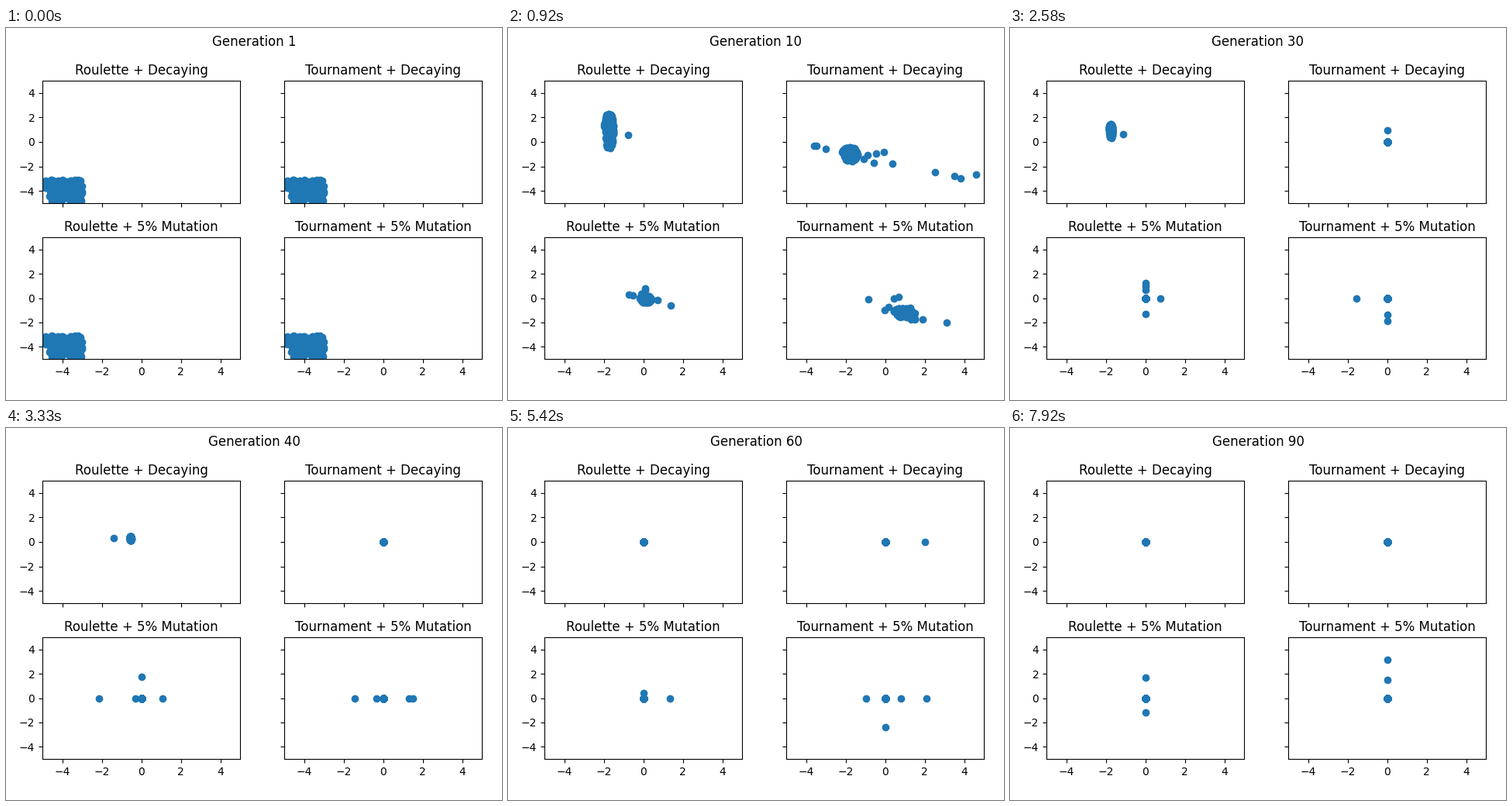
A matplotlib script that plays this animation: 640x480 px, repeating every 8 s.

```python
from collections import namedtuple

import numpy as np
import matplotlib.pyplot as plt
from matplotlib.animation import FuncAnimation

W, H, DPI = 640, 480, 100
LOOP_MS, TICK_MS = 8000, 50
GENERATIONS = 96
LEAD_MS = 40          # generations change slightly ahead of the tick grid
MEET = 11             # generation at which each population reaches its waypoint
TICKS = range(-4, 5, 2)

plt.rcParams["font.family"] = "DejaVu Sans"

# way, spread: cluster centre and half size at the waypoint
# hold, settle: generations when it leaves the waypoint and reaches the origin
# strays, reach: number and distance of early outliers
# mutants: most outliers per generation later on
Panel = namedtuple("Panel", "name way spread hold settle strays reach mutants")
PANELS = [
    Panel("Roulette + Decaying", (-1.75, 0.9), (0.25, 1.5), 31, 44, 2, 0.7, 1),
    Panel("Tournament + Decaying", (-1.8, -1), (0.4, 0.6), 12, 22, 14, 2.8, 1),
    Panel("Roulette + 5% Mutation", (0.1, -0.1), (0.3, 0.3), 12, 18, 5, 0.9, 6),
    Panel("Tournament + 5% Mutation", (0.9, -1.2), (0.5, 0.4), 12, 20, 10, 1, 6),
]

# Shared starting population in a square, thin near the left edge
square = np.random.default_rng(4).uniform(-1, 1, (130, 2))
square = square[(square[:, 0] > -0.65) | (np.abs(square[:, 1] + 0.35) > 0.4)]
disc = square * np.sqrt(1 - square[:, ::-1] ** 2 / 2)


def cluster(p, gen):
    """The square block moves to the waypoint, rounds off, then shrinks to the origin."""
    def along(steps, values):
        return np.array([np.interp(gen, steps, v) for v in zip(*values)])

    origin = (0, 0)
    centre = along((0, MEET, p.hold, p.settle), ((-4, -4), p.way, p.way, origin))
    size = along((0, MEET, p.settle), ((1, 0.95), p.spread, origin))
    rounding = min(gen / MEET, 1)
    return centre + size * (square + (disc - square) * rounding)


def outliers(p, gen, pop, rng):
    # Early strays lie along a falling slope
    fade = np.clip(min(gen / 4, (2 * MEET - gen) / MEET), 0, 1)
    n = round(p.strays * fade)
    dx = rng.normal(0, p.reach, n)
    dy = -0.35 * dx + rng.normal(0, 0.3, n)
    early = pop.mean(axis=0) + np.column_stack([dx, dy])

    # Mutants change one coordinate only
    n = rng.integers(p.mutants // 3, p.mutants + 1)
    late = rng.choice(pop, n)
    late[np.arange(n), rng.integers(2, size=n)] += rng.normal(0, 1.1, n)
    return np.vstack([early, late])


def population(i, gen):
    pop = cluster(PANELS[i], gen)
    if gen == 0:
        return pop
    rng = np.random.default_rng(1000 * i + gen)
    return np.vstack([pop, outliers(PANELS[i], gen, pop, rng)])


fig = plt.figure(figsize=(W / DPI, H / DPI), dpi=DPI, facecolor="white")
title = fig.suptitle("Generation 1", fontsize=12, y=0.982)
dots = []
for i, p in enumerate(PANELS):
    row, col = divmod(i, 2)
    left = 47 + 312 * col
    top, bottom = ((68, 226), (270, 427))[row]
    ax = fig.add_axes([left / W, 1 - bottom / H, 255 / W, (bottom - top) / H])
    ax.set(xlim=(-5, 5), ylim=(-5, 5), xticks=TICKS, yticks=TICKS)
    ax.set_title(p.name, fontsize=12)
    ax.tick_params(labelsize=10, labelbottom=row == 1, labelleft=col == 0)
    dots.append(ax.scatter([], [], color="#1f77b4"))


def draw(tick):
    gen = (tick * TICK_MS + LEAD_MS) * GENERATIONS // LOOP_MS
    title.set_text(f"Generation {max(1, (gen + 1) // 10 * 10)}")
    for i, d in enumerate(dots):
        d.set_offsets(population(i, gen))
    return [title, *dots]


anim = FuncAnimation(fig, draw, frames=LOOP_MS // TICK_MS, interval=TICK_MS,
                     repeat=True, repeat_delay=0, blit=False)
plt.show()
```
